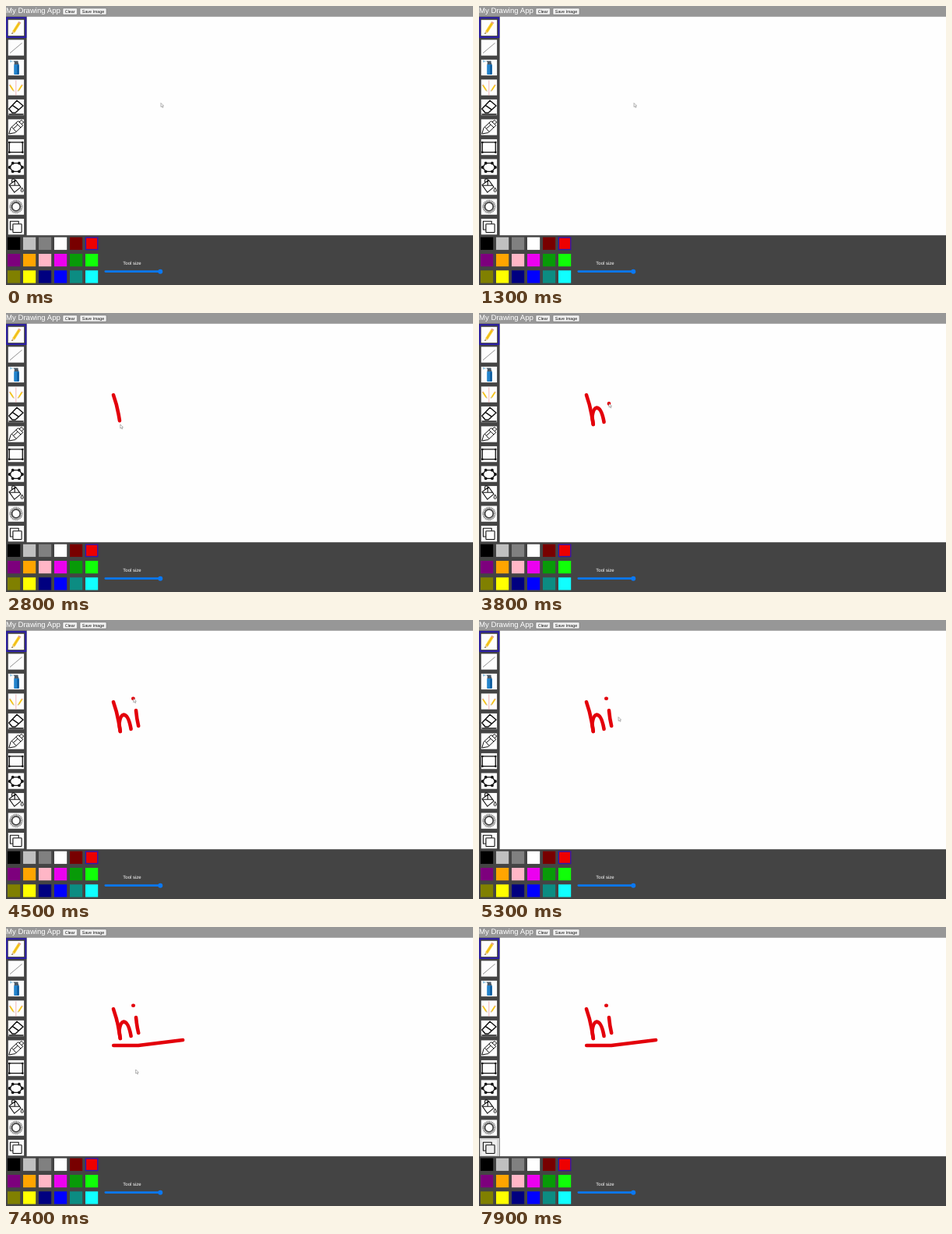
An HTML page for the animation above (8 s loop, 600 by 358 pixels).

```html
<!DOCTYPE html>
<html lang="en">
<head>
<meta charset="utf-8">
<title>My Drawing App</title>
<style>
html, body { margin: 0; width: 100%; height: 100%; overflow: hidden; background: #444; }
svg { display: block; width: 600px; height: 358px; }
text { font-family: "Liberation Sans", Arial, sans-serif; text-rendering: geometricPrecision; }
</style>
</head>
<body>
<svg viewBox="0 0 600 358" xmlns="http://www.w3.org/2000/svg">
  <defs>
    <g id="pencil">
      <path d="M-5 8L-4 4L3 -7L6 -5L-1 6Z" fill="#f9d028"/>
      <path d="M-2.5 5L4.5 -6" stroke="#e2a012" stroke-width=".8"/>
      <path d="M3 -7L4 -8.3L7 -6.4L6 -5Z" fill="#e09a8c"/>
      <path d="M-5 8L-4 4L-1 6Z" fill="#ecd0a0"/>
      <path d="M-5 8L-4.6 6.3L-3.4 7Z" fill="#222"/>
    </g>
    <g id="button">
      <rect x="-.5" y="2.9" height="8.2" rx="1"/>
    </g>
  </defs>
  <rect width="600" height="358" fill="#444"/>
  <rect width="600" height="13.6" fill="#979797"/>
  <rect x="26" y="13.6" width="1.3" height="280.6" fill="#8a8a8a"/>
  <rect x="27" y="13.6" width="573" height="280.6" fill="#fefefe"/>
  <text y="9.3" font-size="9.6" fill="#fff">My Drawing App</text>
  <g id="buttons" font-size="5.3" text-anchor="middle"></g>

  <rect x="1.2" y="15.2" width="24.2" height="24.8" fill="#444" stroke="#281ab0" stroke-width="1.8"/>
  <rect id="hover" x="1" y="271" width="25" height="23.2" fill="#d4d4d4"/>
  <g id="tiles"></g>
  <g id="icons" fill="none" stroke="#111" stroke-width="1.3" stroke-linejoin="round">
    <use href="#pencil" x="12.4" y="28" stroke="none"/>
    <path d="M5 60.5L20.5 47.5" stroke="#777" stroke-width=".8"/>
    <g stroke="none">
      <rect x="10.2" y="75" width="6.6" height="13" rx=".8" fill="#2384cc"/>
      <rect x="14.4" y="75.5" width="2.2" height="12" fill="#0c5596"/>
      <path d="M10.4 75L11 72.6L9.4 70.4H15.6V72.6L16.6 75Z" fill="#4a5a68"/>
      <path d="M5 69.2L9.6 71L5 72.6Z" fill="#9ccbe8"/>
    </g>
    <path d="M12.8 95.5V115" stroke="#ee9a9a" stroke-width=".7"/>
    <g stroke="none">
      <use href="#pencil" transform="translate(18 105) scale(.55)"/>
      <use href="#pencil" transform="translate(7.6 105) scale(-.55 .55)"/>
    </g>
    <path d="M3.8 132L14 121.2L22 128L12 137H8ZM8.2 127.4L16.4 133.2M3.5 139H22.5" stroke-width="1.5"/>
    <path d="M3.8 164L6 156.5L15.5 147.6L21.8 153.2L11.8 162.6ZM7.4 155.2L13 161.4M12.8 150.2L19 156M17 149L20 146.4L22.6 149L20.2 151.8M10 157L15 152.4" stroke-width="1"/>
    <path d="M4 229.6L12.4 223.2L19 232.4L10.8 239.2ZM7.6 227V223Q9.4 220.6 11.2 223V230M4 230.2H17.6" stroke-width="1.1"/>
    <path d="M20.6 233Q23.6 238 20.6 238.6Q17.8 238 20.6 233Z" stroke-width="1"/>
    <circle cx="12.9" cy="257.5" r="7.2" stroke="#777" stroke-width="3" stroke-dasharray="1.1 .78"/>
    <circle cx="12.9" cy="257.5" r="5.3" stroke="#444" stroke-width="1.7"/>
    <g stroke-width="1.1">
      <path d="M8.8 287H5.4V276.2H16.2V279.6"/>
      <rect x="8.9" y="279.7" width="11.2" height="10.8" rx=".6"/>
    </g>
  </g>
  <g id="swatches"></g>

  <text x="162" y="332" font-size="6" text-anchor="middle" fill="#fff">Tool size</text>
  <rect x="126.5" y="339.2" width="74" height="2.8" rx="1.4" fill="#0a78f4"/>
  <circle cx="198.3" cy="340.7" r="3" fill="#0a78f4"/>

  <g id="ink" fill="none" stroke="#e3000b" stroke-width="4.6" stroke-linecap="round" stroke-linejoin="round"></g>
  <path id="cursor" d="M0 0V5L1.2 4L2.1 5.9L3 5.5L2.2 3.6H3.6Z" fill="#fff" stroke="#777" stroke-width=".55"/>
</svg>
<script>
const LOOP = 8000, STEP = 100;
const $ = id => document.getElementById(id);
const clamp = v => Math.min(1, Math.max(0, v));
const ease = v => v * v * (3 - 2 * v);

function add(parent, tag, attrs) {
  const el = document.createElementNS("http://www.w3.org/2000/svg", tag);
  for (const k in attrs) el.setAttribute(k, attrs[k]);
  return parent.appendChild(el);
}

function button(label, x, width) {
  add($("buttons"), "rect", {
    x, y: 2.9, width, height: 8.2, rx: 1, fill: "#f0f0f0", stroke: "#707070", "stroke-width": .5
  });
  add($("buttons"), "text", { x: x + width / 2, y: 8.9, fill: "#111" }).textContent = label;
}
button("Clear", 73, 18.4);
button("Save Image", 95, 34);

for (let i = 0; i < 11; i++) {
  add($("tiles"), "rect", { x: 2.8, y: 17.8 + 25.52 * i, width: 20.3, height: 20.3, fill: "#fdfdfd" });
}

// Outline with a handle on each corner
function shape(n, cy, rx, ry, turn, r) {
  const pts = Array.from({ length: n }, (_, i) => {
    const a = (i + turn) * 2 * Math.PI / n;
    return [12.8 + rx * Math.cos(a), cy + ry * Math.sin(a)];
  });
  add($("icons"), "polygon", { points: pts.join(" ") });
  for (const [cx, cy] of pts) add($("icons"), "circle", { cx, cy, r, fill: "#111", stroke: "none" });
}
shape(4, 181.3, 12, 9, .5, 1.3);
shape(6, 207, 8.2, 6.2, 0, 1.9);

const colors = (
  "#000 #c0c0c0 #808080 #fff #780000 #ee0000 " +
  "#7d007d #ffa500 #ffb6c6 #ec00f0 #089a08 #10ff08 " +
  "#808000 #ffff00 #000080 #0000ff #0c8c82 #10ffff"
).split(" ");
colors.forEach((fill, i) => {
  const x = 2 + 20 * (i % 6), y = 296.7 + 21.3 * Math.floor(i / 6);
  add($("swatches"), "rect", { x, y, width: 16.2, height: 16.2, fill });
});
add($("swatches"), "rect", {
  x: 102.4, y: 297.1, width: 15.4, height: 15.4, fill: "none", stroke: "#281ab0", "stroke-width": 1.4
});

// The pointer runs along each path from one time to the other and glides between paths
const track = (d, from, to, lag) => {
  const el = add($("ink"), "path", { d, pathLength: 1, visibility: "hidden" });
  return { el, from, to, lag, len: el.getTotalLength() };
};
const pen = (d, from, to, lag = 25) => track(d, from, to, lag);
const rest = (x, y, from, to) => track(`M${x} ${y}h.1`, from, to);

const tracks = [
  rest(199, 124.5, 0, 2000),
  pen("M138 105.2Q142.6 118 144.6 130L146.8 143", 2600, 2800),
  pen("M146.8 143L145.4 133Q147 122.4 151 121.6Q157.4 121.6 160.6 140", 2900, 3400),
  pen("M167 116Q168 127 170.2 136", 3800, 4100),
  pen("M163.3 100.7h.5", 4450, 4500),
  rest(179, 124.5, 4900, 5400),
  pen("M138.2 152H170L227.2 145", 6000, 6400, 400),
  rest(227, 145.5, 6400, 7200),
  rest(-6, 290, 7800, LOOP)
];

function pointer(t) {
  const i = tracks.findLastIndex(s => t >= s.from);
  const a = tracks[i], b = tracks[i + 1];
  const p = a.el.getPointAtLength(a.len * clamp((t - a.from) / (a.to - a.from)));
  if (!b || t <= a.to) return p;
  const q = b.el.getPointAtLength(0), k = ease((t - a.to) / (b.from - a.to));
  return { x: p.x + (q.x - p.x) * k, y: p.y + (q.y - p.y) * k };
}

function draw(t) {
  for (const { el, from, to, lag } of tracks) {
    if (!lag) continue;
    const p = Math.max(.02, clamp((t - lag - from) / (to - from)));
    el.setAttribute("visibility", t >= from ? "visible" : "hidden");
    el.setAttribute("stroke-dasharray", p < 1 ? p + " 2" : "none");
  }
  const { x, y } = pointer(t);
  $("cursor").setAttribute("transform", `translate(${x} ${y})`);
  const over = t >= 7700;
  $("hover").setAttribute("visibility", over ? "visible" : "hidden");
  $("tiles").lastChild.setAttribute("fill", over ? "#eee" : "#fdfdfd");
}

const start = performance.now();
function tick(now) {
  const t = Math.max(0, now - start) % LOOP;
  draw(Math.floor(t / STEP) * STEP);
  requestAnimationFrame(tick);
}
draw(0);
requestAnimationFrame(tick);
</script>
</body>
</html>
```
